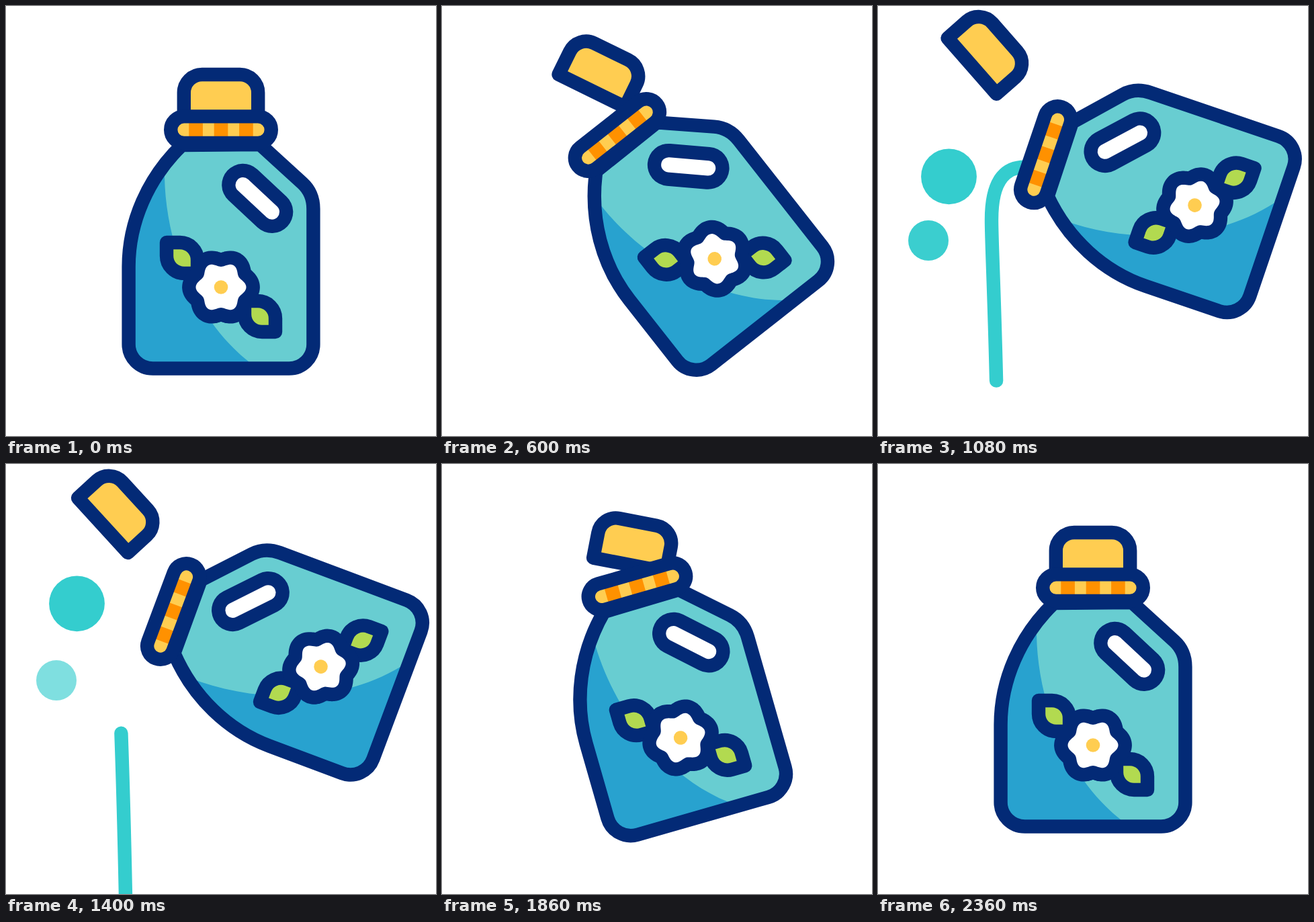
Recreate the animation shown at these times as an HTML page. Size 640 by 640 pixels, loop 2400 ms.

```html
<!DOCTYPE html>
<html lang="en">
<head>
<meta charset="utf-8">
<title>Pouring bottle</title>
<style>
  html, body { margin: 0; height: 100%; overflow: hidden; background: #fff; }
  svg { display: block; width: 100%; height: 100%; }
  .line { stroke: #032a76; stroke-width: 20.4; stroke-linejoin: round; }
  .round { fill: none; stroke-linecap: round; }
  .aqua { fill: #34cdce; }
</style>
</head>
<body>
<svg viewBox="0 0 640 640">
  <defs>
    <path id="body" d="M262 207C211 256 182.6 322 182.6 388V503.5a36 36 0 0 0 36 36H421.4a36 36 0 0 0 36-36V302C457.4 287 452 273.5 441 263.5L378 206Z"/>
    <clipPath id="inside"><use href="#body"/></clipPath>
    <path id="leaf" class="line" fill="#b2da50" d="M239 352H259A26 26 0 0 1 285 378V398H265A26 26 0 0 1 239 372Z"/>
  </defs>

  <path id="stream" class="round" stroke="#34cdce" stroke-width="20.4" pathLength="100"
    d="M232 241C190 234 169 258 169 318C169 360 174 430 178.5 670"/>
  <circle id="bubbleA" class="aqua" cx="105.5" r="41.4"/>
  <circle id="bubbleB" class="aqua" cx="75" r="30"/>

  <path id="cap" class="line" fill="#ffcd51"
    d="M264.8 167V129a27 27 0 0 1 27-27h56.4a27 27 0 0 1 27 27v38z"/>

  <g id="bottle">
    <use href="#body" fill="#68cdd1"/>
    <path clip-path="url(#inside)" fill="#28a2cf" d="M236 240C234 350 280 465 362 530V545H170V240Z"/>
    <use href="#body" class="line" fill="none"/>
    <path class="round" stroke="#032a76" stroke-width="63" d="M352.7 266.3L395.8 306.5"/>
    <path class="round" stroke="#fff" stroke-width="22.4" d="M352.7 266.3L395.8 306.5"/>
    <use href="#leaf"/>
    <use href="#leaf" x="116" y="87"/>
    <path id="flower" fill="#fff" stroke="#032a76" stroke-width="40.8" stroke-linejoin="round" paint-order="stroke"/>
    <circle cx="320" cy="418.5" r="10.3" fill="#ffcd51"/>
    <rect x="245.2" y="164.4" width="149.6" height="39.6" rx="19.8" fill="#ffcd51"/>
    <path stroke="#ff9100" stroke-width="20.6" d="M282.6 170v28M320 170v28M357.4 170v28"/>
    <rect class="line" x="245.2" y="164.4" width="149.6" height="39.6" rx="19.8" fill="none"/>
  </g>
</svg>
<script>
const LOOP = 2400, TILT = 71.6;
const [stream, bubbleA, bubbleB, cap, bottle, flower] =
  ['stream', 'bubbleA', 'bubbleB', 'cap', 'bottle', 'flower'].map(id => document.getElementById(id));

// Six soft petals in polar form
const rim = Array.from({ length: 120 }, (_, i) => {
  const angle = i * Math.PI / 60, radius = 34 + 3.5 * Math.cos(6 * angle);
  return `${(320 + radius * Math.cos(angle)).toFixed(2)} ${(418.5 + radius * Math.sin(angle)).toFixed(2)}`;
});
flower.setAttribute('d', `M${rim.join('L')}Z`);

const ramp = (t, start, end) => Math.min(1, Math.max(0, (t - start) / (end - start)));

// cubic-bezier(.767, 0, .225, 1), solved by bisection
function ease(x) {
  let low = 0, high = 1;
  for (let i = 0; i < 24; i++) {
    const s = (low + high) / 2, r = 1 - s;
    if (3 * .767 * s * r * r + 3 * .225 * s * s * r + s * s * s < x) low = s;
    else high = s;
  }
  return low * low * (3 - 2 * low);
}

function rise(bubble, y, opacity) {
  bubble.setAttribute('cy', y);
  bubble.setAttribute('opacity', opacity);
}

function draw(now) {
  const t = now % LOOP;
  const pour = ease(ramp(t, 0, 1191)) - ease(ramp(t, 1164, 2359));

  bottle.setAttribute('transform',
    `translate(${6.6 * pour} ${-96.4 * pour}) rotate(${-TILT * pour} 374.3 304.3)`);
  cap.setAttribute('transform',
    `translate(${-173.5 * pour} ${-74.7 * pour}) rotate(${49 * pour} 320 157)`);

  const head = 100 * ramp(t, 762, 1181), tail = 100 * ramp(t, 1222, 1641);
  stream.setAttribute('stroke-dasharray', `${head - tail} 300`);
  stream.setAttribute('stroke-dashoffset', -tail);
  stream.setAttribute('opacity', head > tail ? 1 : 0);

  rise(bubbleA, 254 - .144 * (t - 1080), ramp(t, 750, 1000) - ramp(t, 1400, 1640));
  rise(bubbleB, 349 - .084 * (t - 1080), ramp(t, 840, 1090) - ramp(t, 1305, 1562));

  requestAnimationFrame(draw);
}
draw(performance.now());
</script>
</body>
</html>
```
